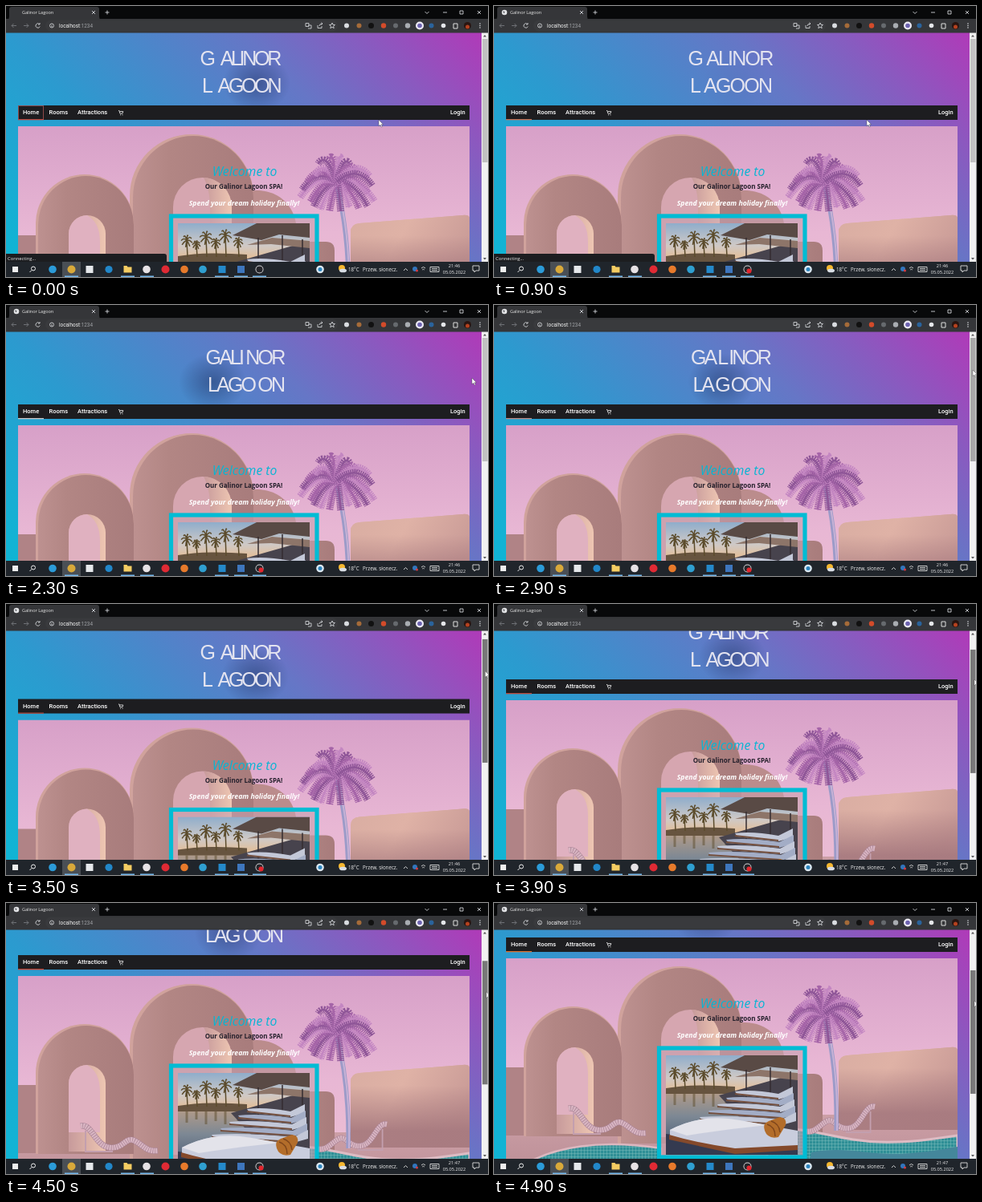
An HTML page for the animation above (5 s loop, 600 px wide and 338 px high).

```html
<!DOCTYPE html>
<html lang="en">
<head>
<meta charset="utf-8">
<title>Galinor Lagoon</title>
<style>
html, body { margin: 0; width: 100%; height: 100%; overflow: hidden; background: #111; }
svg { display: block; width: 600px; height: 338px; }
.ui { font-family: "Open Sans", "Noto Sans", sans-serif; fill: #eee; }
.nav { font: 500 7.5px Roboto, sans-serif; fill: #fff; }
.big { font: 25px "Liberation Sans", Arial, sans-serif; fill: #e4e4f0; }
.mid { text-anchor: middle; }
</style>
</head>
<body>
<svg viewBox="0 0 600 338" xmlns="http://www.w3.org/2000/svg">
<defs>
  <linearGradient id="bg" gradientUnits="userSpaceOnUse" x1="21" y1="562" x2="571" y2="12">
    <stop offset="0" stop-color="#00bcd4"/><stop offset=".23" stop-color="#12b3d4"/>
    <stop offset=".46" stop-color="#2c9acf"/><stop offset=".73" stop-color="#6676c6"/>
    <stop offset=".87" stop-color="#8c58bf"/><stop offset="1" stop-color="#b03ab8"/>
  </linearGradient>
  <linearGradient id="sky" x2="0" y2="1">
    <stop offset="0" stop-color="#d7a0c8"/><stop offset=".4" stop-color="#e8b7d4"/><stop offset="1" stop-color="#efc6d2"/>
  </linearGradient>
  <linearGradient id="face">
    <stop offset="0" stop-color="#bd9190"/><stop offset=".3" stop-color="#b28684"/><stop offset="1" stop-color="#a87c7c"/>
  </linearGradient>
  <linearGradient id="lit">
    <stop offset="0" stop-color="#c79a9b"/><stop offset="1" stop-color="#eec6b2"/>
  </linearGradient>
  <linearGradient id="wall" x2="1" y2=".4">
    <stop offset="0" stop-color="#d9ada2"/><stop offset=".45" stop-color="#dfb2a6"/><stop offset="1" stop-color="#c99b97"/>
  </linearGradient>
  <linearGradient id="fall" x2="0" y2="1">
    <stop offset=".25" stop-color="#a5787e" stop-opacity="0"/><stop offset=".8" stop-color="#a5787e" stop-opacity=".9"/>
  </linearGradient>
  <linearGradient id="floor" x2="0" y2="1">
    <stop offset="0" stop-color="#cc9fa6"/><stop offset="1" stop-color="#ac7f88"/>
  </linearGradient>
  <linearGradient id="dusk" x2="0" y2="1">
    <stop offset="0" stop-color="#8fadcb"/><stop offset=".6" stop-color="#cfc9c6"/><stop offset="1" stop-color="#e6bc90"/>
  </linearGradient>
  <linearGradient id="sea" x2="0" y2="1">
    <stop offset="0" stop-color="#b59c88"/><stop offset=".4" stop-color="#7d8894"/><stop offset="1" stop-color="#3c506e"/>
  </linearGradient>
  <radialGradient id="dim">
    <stop offset="0" stop-color="#10204a" stop-opacity=".45"/><stop offset="1" stop-color="#10204a" stop-opacity="0"/>
  </radialGradient>
  <pattern id="tile" width="4" height="4" patternUnits="userSpaceOnUse">
    <rect width="4" height="4" fill="#2f8f96"/><path d="M0 0H4M0 0V4" stroke="#8cc6c4" stroke-width=".8"/>
  </pattern>
  <clipPath id="view"><rect y="33" width="600" height="286"/></clipPath>
  <clipPath id="hero"><rect x="15" y="69" width="562" height="330"/></clipPath>
  <clipPath id="shot"><rect x="214" y="190" width="164" height="124"/></clipPath>
</defs>

<g clip-path="url(#view)">
  <rect y="33" width="592" height="509" fill="url(#bg)"/>
  <g id="page">
    <ellipse id="shade" cy="96" rx="42" ry="36" fill="url(#dim)"/>
    <text class="big" id="top" y="74">GALINOR</text>
    <text class="big" id="low" y="108">LAGOON</text>

    <rect x="15" y="124" width="562" height="18" fill="#1d1d20"/>
    <rect id="focus" x="15.5" y="124.500" width="31" height="17" fill="none" stroke="#8d4848"/>
    <rect id="line" x="15" y="141" width="32" height="1.3"/>
    <g class="nav">
      <text x="21" y="135.3">Home</text><text x="53.5" y="135.3">Rooms</text>
      <text x="89" y="135.3">Attractions</text><text x="553" y="135.3">Login</text>
    </g>
    <path d="M140 130.500H141l.8 3.500h3.200l.8-2.500h-4.300" fill="none" stroke="#ddd" stroke-width=".9"/>
    <path d="M142 135.800h1m1.500 0h1" stroke="#ddd"/>

    <g transform="translate(0 81)">
      <g clip-path="url(#hero)">
        <rect x="15" y="69" width="562" height="330" fill="url(#sky)"/>
        <path d="M15 264H577V400H15Z" fill="url(#floor)"/>
        <path d="M15 205H60V290H15Z" fill="#b08386"/>
        <path d="M300 300V150C335 144 362 165 362 202V300Z" fill="#bb8c8c"/>
        <path d="M340 300V223Q342 213 355 213H398Q409 213 409 224V300Z" fill="url(#face)"/>
        <path d="M154 292V156A77 77 0 0 1 308 156V300H154Z" fill="#d0a29c"/>
        <path d="M158 292V158A75 77 0 0 1 308 158V300H158Z" fill="url(#face)"/>
        <path d="M208 292V170A36.500 37 0 0 1 281 170V292Z" fill="#d6a6b0"/>
        <path d="M246 133A36.500 37 0 0 1 281 170V292H254V170C254 155 251 142 246 133Z" fill="url(#lit)"/>
        <path d="M37 291V190A61 61 0 0 1 159 190V291Z" fill="#d0a29c"/>
        <path d="M40 291V192A59.500 61 0 0 1 159 192V291Z" fill="url(#face)"/>
        <path d="M78 288V203A23 23 0 0 1 124 203V288Z" fill="url(#lit)"/>
        <path d="M78 284V203A23 23 0 0 1 101 180C112 187 117 196 117 214V264H78Z" fill="#e0b1c0"/>
        <path id="slab" d="M429 276V201Q429 191 440 190L568 180Q577 179 577 184V283H429Z" fill="url(#wall)"/>
        <use href="#slab" style="fill:url(#fall)"/>
        <path d="M429 276V201Q429 191 440 190L568 180Q577 179 577 184V283H429Z" fill="url(#fall)"/>
        <path d="M40 325C75 305 130 294 208 306V400H30Z" fill="url(#tile)" stroke="#dcb8c0" stroke-width="2.500"/>
        <path d="M340 283C395 277 425 297 480 298C520 299 550 294 577 290V400H340Z" fill="url(#tile)" stroke="#ddbcc4" stroke-width="3"/>
        <path d="M395 311C440 302 470 317 520 312S560 306 577 304V400H380Z" fill="#44879b"/>
        <g id="beds" fill="none"></g>
        <path d="M426 284C427 240 424 190 411 140" fill="none" stroke="#9c9bc8" stroke-width="5.500"/>
        <path d="M427 284C428 240 425 190 412 140" fill="none" stroke="#c9b3d6" stroke-width="1.800"/>
        <g id="palm" fill="none"></g>
      </g>

      <rect x="205.500" y="181" width="181.500" height="136" fill="#c8a0b0" fill-opacity=".6" stroke="#00bcd4" stroke-width="5.200"/>
      <g clip-path="url(#shot)">
        <rect x="214" y="190" width="164" height="46" fill="url(#dusk)"/>
        <rect x="214" y="234" width="164" height="80" fill="url(#sea)"/>
        <path d="M214 231Q250 225 300 229V238H214Z" fill="#67543f"/>
        <g id="grove" fill="none" stroke="#5c4c2c"></g>
        <path d="M280 240L378 212V300L310 272Z" fill="#47434d"/>
        <path d="M282 205L312 190H378V208L340 204L318 211Z" fill="#594a45"/>
        <path d="M300 217L331 208L378 212V221L330 216Z" fill="#8d7569"/>
        <path d="M314 208V247M344 205V260M369 210V268" stroke="#352d30" stroke-width="1.500"/>
        <g id="rows"></g>
        <path d="M214 288L300 297L378 300V314H214Z" fill="#343a50"/>
        <path d="M219 283Q258 262 306 271L378 284V303L300 308Q252 301 219 290Z" fill="#c9cddd"/>
        <path d="M219 283Q258 262 306 271L340 277Q290 282 240 290Z" fill="#e3e3ea"/>
        <path d="M218 289Q255 300 300 306L378 302V308L300 313L218 295Z" fill="#84492b"/>
        <path d="M337 284Q334 275 342 272L356 267Q365 268 363 277L354 292Q341 295 337 284Z" fill="#b36d2a"/>
        <path d="M340 276Q350 279 350 291M345 272Q355 275 356 286" fill="none" stroke="#80471c" stroke-width="1.500"/>
      </g>
      <g class="ui mid">
        <text x="297" y="131" font-size="15.800" font-style="italic" style="fill:#08b5d3">Welcome to</text>
        <text x="296" y="147" font-size="8" font-weight="700" style="fill:#25202c">Our Galinor Lagoon SPA!</text>
        <text x="296.500" y="167.500" font-size="8.700" font-weight="700" font-style="italic" style="fill:#fff">Spend your dream holiday finally!</text>
      </g>
    </g>
  </g>

  <rect x="592" y="33" width="8" height="286" fill="#f1f1f1"/>
  <path d="M594 38.500L596 36L598 38.500ZM594 314L596 316.500L598 314Z" fill="#555"/>
  <rect id="thumb" x="593" y="41" width="6.500" height="154"/>
  <g id="status">
    <path d="M0 309H197Q200 309 200 312V319H0Z" fill="#1c1d20"/>
    <text class="ui" x="2" y="316.500" font-size="5.800">Connecting...</text>
  </g>
</g>

<rect width="600" height="17" fill="#08090a"/>
<path d="M2 17Q4 16 4 13V4Q4 1 7 1H113Q116 1 116 4V13Q116 16 118 17Z" fill="#353639"/>
<rect y="16" width="600" height="17.500" fill="#353639"/>
<rect x="49" y="17.500" width="364" height="14" rx="7" fill="#393a3d"/>
<g id="globe"><circle cx="13" cy="8" r="3.300" fill="#e2e3e5"/><path d="M11 6.500L13.500 7L12.500 9.500ZM14 9l1.500-1" fill="#55585c"/></g>
<text class="ui" x="20" y="10.300" font-size="5.500">Galinor Lagoon</text>
<text x="66" y="26.800" font-family="Roboto, sans-serif" font-size="6.400" fill="#f0f0f0">localhost<tspan fill="#a0a3a7">:1234</tspan></text>
<g fill="none" stroke="#cfd1d4" stroke-width=".9">
  <path d="M107 6l4 4m0-4l-4 4M123.500 8h5M126 5.500v5M521.500 7l2.500 2.500L526.500 7M544 8h5M565 6h4v4h-4ZM587 6l4 4m0-4l-4 4"/>
  <path d="M13 24.500H7m2.500-2.500L7 24.500L9.500 27M22 24.500h6m-2.500-2.500L28 24.500L25.500 27" stroke="#77797d"/>
  <path d="M41.500 22.500a2.700 2.700 0 1 0 .7 3M42 21v2h-2"/>
  <circle cx="57" cy="24.500" r="2.500"/><path d="M57 24v2"/>
  <path d="M373 21.500h4v4h-4ZM376 24h4v4h-4M388 24v3.500h5V25M390 25q0-3 4-3l-1.500-1.500M394 22l-1.500 1.500"/>
  <path d="M406 21l1 2.300 2.500.2-1.900 1.700.6 2.500-2.200-1.400-2.200 1.400.6-2.500-1.900-1.700 2.500-.2Z"/>
</g>
<g fill="#d5d7da"><circle cx="590" cy="22" r=".8"/><circle cx="590" cy="24.500" r=".8"/><circle cx="590" cy="27" r=".8"/></g>
<g id="addons"></g>

<rect y="319" width="600" height="19" fill="#20252b"/>
<rect x="70" y="319" width="23" height="19" fill="#4a4f55"/>
<rect x="8" y="325" width="7" height="7" fill="#eee"/>
<g fill="none" stroke="#eee"><circle cx="34" cy="327.500" r="2.500"/><path d="M32 329.500l-2.500 2.500"/></g>
<g id="tasks"></g>
<circle cx="418" cy="327" r="4" fill="#f6b72f"/><ellipse cx="419.500" cy="330" rx="4.500" ry="2.300" fill="#d8dde4"/>
<g class="ui" font-size="6.200">
  <text x="426" y="331">18°C</text><text x="444" y="331">Przew. słonecz.</text>
  <g class="mid" font-size="5.600"><text id="clock" x="558" y="326.300">21:46</text><text x="558" y="334.300">05.05.2022</text></g>
</g>
<g fill="none" stroke="#ddd" stroke-width=".9">
  <path d="M495 330l2.500-2.500L500 330M517 327q2.500-3 5 0M518.200 329q1.300-1.500 2.600 0M528 325.500h11v6h-11ZM530 327.500h7M530 329.500h7"/>
  <path d="M581 324h8v6h-4l-2 2v-2h-2Z"/>
</g>
<circle cx="509" cy="328" r="3" fill="#3276bd"/><circle cx="511.500" cy="330" r="1.500" fill="#d63b42"/>
<path id="mouse" d="M0 0V7.800L1.900 6.200L3.200 9L4.500 8.400L3.200 5.700H5.500Z" fill="#fff" stroke="#333" stroke-width=".4"/>
</svg>

<script>
const $ = id => document.getElementById(id);
const put = (id, list) => { $(id).innerHTML = list.join(""); };
const dot = ([x, y, r, c]) => `<circle cx="${x}" cy="${y}" r="${r}" fill="${c}"/>`;

put("addons", [
  [424, 24.5, 3, "#d9dce0"], [439.5, 24.5, 3, "#a56b39"], [454.5, 24.5, 3.5, "#111"],
  [470, 24.5, 3.2, "#d34b2a"], [485, 24.5, 3, "#666a6e"], [500, 24.5, 3.2, "#a9adb2"],
  [515, 24.5, 5, "#eceaf5"], [515, 24.5, 2.8, "#6c62b0"], [529.5, 24.5, 3, "#2a639c"],
  [544.5, 24.5, 2.8, "#e5e7ea"], [574.5, 24.5, 4.5, "#291511"], [574.5, 26, 2.5, "#b6421f"]
].map(dot).concat('<path d="M557 22h5v6h-5Z" fill="none" stroke="#ddd"/>'));

const bar = x => `<rect x="${x}" y="336.500" width="17" height="1.500" fill="#76b9ed"/>`;
put("tasks", [
  [58, 328.5, 4.8, "#2b9bd8"], [81.5, 328.5, 5, "#d9a93a"], [128, 328.5, 4.6, "#2287c9"],
  [175, 328.5, 4.8, "#e6e2e5"], [198.5, 328.5, 5, "#e02a34"], [222, 328.5, 4.8, "#e77a2b"],
  [245, 328.5, 4.8, "#2f9fd0"], [315.5, 328.5, 5, "#d5d5d8"], [315.5, 328.5, 4.1, "#25252a"],
  [391, 328.5, 4.8, "#dce9f2"], [391, 328.5, 2.5, "#2b83bd"]
].map(dot).concat(
  [[99.5, "#e5e8eb"], [264.5, "#2489ca"], [288, "#3e76bd"]].map(([x, c]) =>
    `<rect x="${x}" y="324" width="9" height="9" fill="${c}"/>`),
  '<path d="M146.500 324h4l1 1.500h5v7h-10Z" fill="#f4cc62"/>',
  [73, 143, 167, 260, 284, 307].map(bar),
  '<circle id="rec" cx="317.500" cy="330.500" r="3" fill="#e3262e"/>'));

// Palm crown: drooping ribs with dashed leaflets
const fronds = [];
for (let i = 0; i < 21; i++) {
  const a = i / 21 * Math.PI * 2, len = 27 + i * 7 % 9;
  const [c, s] = [Math.cos(a), Math.sin(a)];
  const x = 413 + c * len * 1.4, y = 136 + s * len + 14 * Math.abs(c) + 3;
  const d = `M412 138Q${413 + c * len * .8} ${124 + s * len * .8} ${x} ${y}`;
  const hue = ["#a564a8", "#c487c2", "#8f5698"][i % 3];
  fronds.push(`<path d="${d}" stroke="${hue}" stroke-width="9" stroke-dasharray="1.500 .9"/>`,
    `<path d="${d}" stroke="${hue}" stroke-width="2.500"/>`);
}
put("palm", fronds);

const bed = (x, y, k) => {
  const d = "M0 0C14-3 18 25 36 27S56 12 68 19S82 32 96 31";
  return `<g transform="translate(${x} ${y}) scale(${k} 1)">
    <path d="M6 6V32H40" stroke="#c39fae" stroke-width="2"/>
    <path d="${d}" stroke="#a98294" stroke-width="7.500"/>
    <path d="${d}" stroke="#d8b5c2" stroke-width="6.500" stroke-dasharray="2.200 .7"/></g>`;
};
put("beds", [bed(93, 256, 1), bed(474, 254, -.9)]);

put("grove", [[225, 211, 7], [237, 216, 5], [249, 207, 8], [261, 214, 6], [273, 205, 8], [289, 213, 6]].map(([x, y, r]) => {
  let d = `M${x} ${y}L${x + 1} 232`;
  for (let i = 0; i < 8; i++) {
    const a = i * Math.PI / 4 + .2;
    d += `M${x} ${y}q${Math.cos(a) * r * .6} ${Math.sin(a) * r - 2} ${Math.cos(a) * r} ${Math.sin(a) * r + 2}`;
  }
  return `<path d="${d}" stroke-width="1.500"/><path d="M${x} 238v${r * 2}" stroke-width="3" opacity=".5"/>`;
}));

put("rows", [0, 1, 2, 3, 4].map(i => {
  const x = 300 - i * 11, y = 235 + i * 8, w = 54 + i * 12;
  return `<path d="M${x} ${y}Q${x + w * .4} ${y - 3} ${x + w} ${y + 3}L${x + w + 18} ${y - 6}V${y + 5}L${x + w} ${y + 10}L${x + 3} ${y + 4}Z" fill="${i % 2 ? "#a3adc6" : "#c3c8d8"}"/>
    <path d="M${x} ${y + 3}L${x + w} ${y + 9}" stroke="#74503f" stroke-width="1.800"/>`;
}));

// Each row: time, then values
const TITLE = [
  [0, 243, -3.3, 9, 0], [900, 243, -1.8, 5, 0], [2300, 250, -2.8, 4, 3],
  [3500, 243, -3.3, 9, 0], [3900, 243, -3.3, 9, 0], [4500, 247, -2.8, 5, 2], [5000, 249, -2.8, 4, 3]
];
const SHADE = [
  [0, 312, .9], [900, 300, .1], [2300, 257, .9], [3500, 310, .9], [5000, 260, .8]
];
const SCROLL = [[0, 0], [3400, 0], [3500, 5.5], [3900, 30], [4500, 59], [4900, 81], [5000, 81]];
const MOUSE = [
  [0, 464, 142], [1300, 464, 142], [2300, 580, 91], [2900, 596, 81],
  [3400, 596, 81], [3900, 598, 94], [4900, 598, 122], [5000, 598, 122]
];
const LINE = [[0, 190, 70, 60], [900, 200, 110, 80], [2300, 205, 195, 195], [3500, 175, 75, 65], [4500, 205, 65, 45], [5000, 225, 120, 40]];

function at(rows, t) {
  const n = Math.max(1, rows.findIndex(r => r[0] >= t));
  const a = rows[n - 1], b = rows[n], k = (t - a[0]) / (b[0] - a[0]);
  return a.slice(1).map((v, i) => v + (b[i + 1] - v) * k);
}

const pen = document.createElement("canvas").getContext("2d");
pen.font = '25px "Liberation Sans", Arial, sans-serif';

function place(el, left, space, gap, split) {
  const word = el.textContent;
  el.setAttribute("x", [...word].map((_, i) => {
    const open = Math.min(1, Math.max(0, i - split));
    return (left + pen.measureText(word.slice(0, i)).width + space * i + gap * open).toFixed(2);
  }).join(" "));
}

const show = (id, on) => $(id).setAttribute("visibility", on ? "visible" : "hidden");

function draw(t) {
  const [left, space, gap, split] = at(TITLE, t);
  place($("top"), left - 1.5, space, gap, split);
  place($("low"), left + 1, space, gap, split);
  const [sx, so] = at(SHADE, t), [scroll] = at(SCROLL, t), [mx, my] = at(MOUSE, t);
  $("shade").setAttribute("cx", sx);
  $("shade").setAttribute("opacity", so);
  $("page").setAttribute("transform", `translate(0 ${-scroll})`);
  $("thumb").setAttribute("y", 41 + scroll * .53);
  $("thumb").setAttribute("fill", t >= 3200 ? "#787878" : t >= 2800 ? "#a8a8a8" : "#c1c1c1");
  $("mouse").setAttribute("transform", `translate(${mx} ${my})`);
  $("line").setAttribute("fill", `rgb(${at(LINE, t).map(Math.round)})`);
  show("status", t < 1200);
  show("globe", t >= 600);
  show("rec", t >= 600);
  show("focus", t < 600);
  $("clock").textContent = t < 3700 ? "21:46" : "21:47";
}

const start = performance.now();
function tick() {
  const t = (performance.now() - start) % 5000;
  draw(Math.floor(t / 100) * 100);
  requestAnimationFrame(tick);
}
tick();
</script>
</body>
</html>
```
